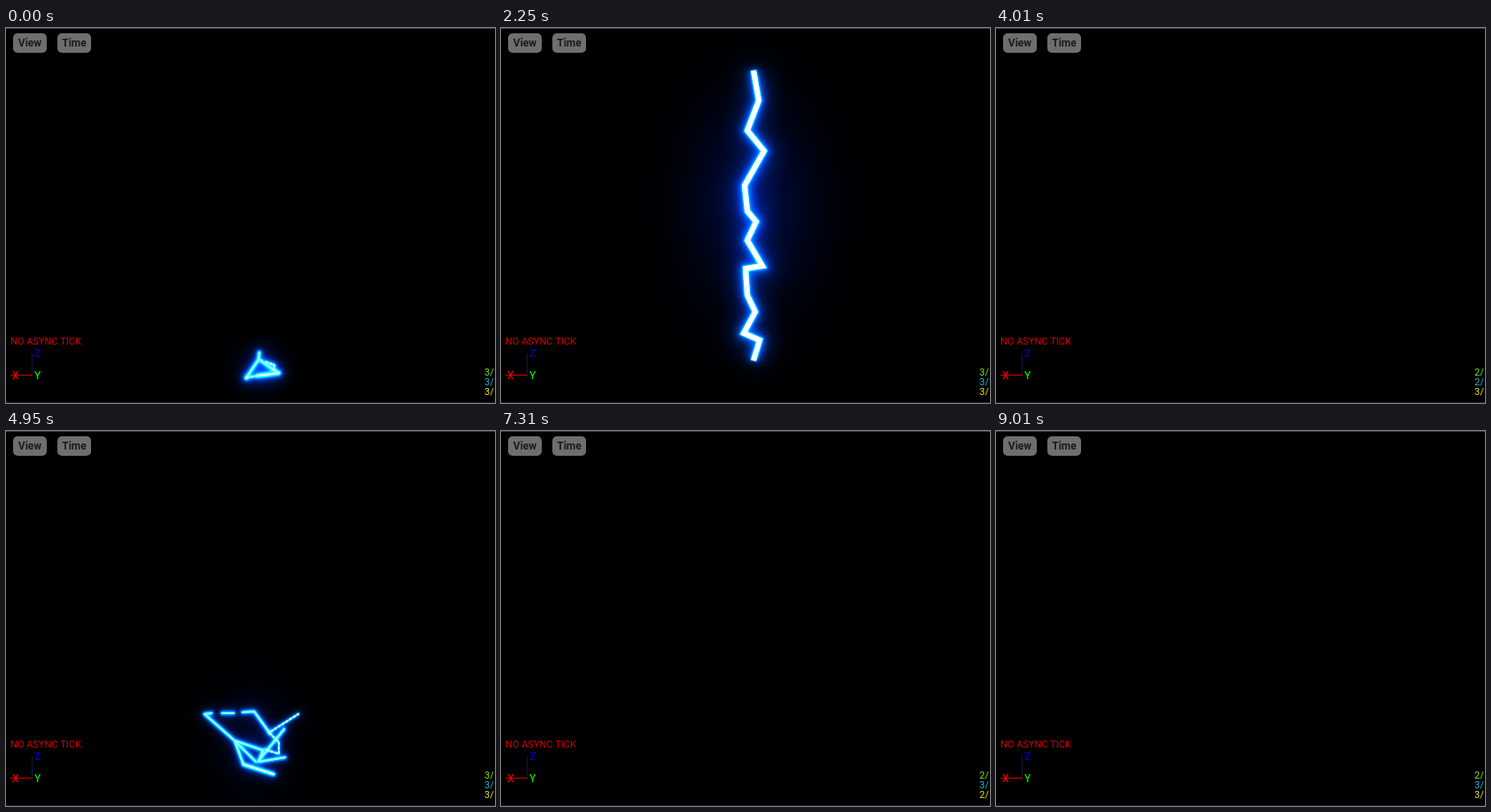
Animation of 552 by 424 pixels, one loop 9.19 s. Source, as an HTML page with a canvas:

```html
<!DOCTYPE html>
<html lang="en">
<head>
<meta charset="utf-8">
<title>Lightning preview</title>
<style>
  html, body { margin: 0; width: 100%; height: 100%; overflow: hidden; background: #000; }
  canvas { display: block; }
</style>
</head>
<body>
<canvas id="stage" width="552" height="424"></canvas>
<script>
const ctx = document.getElementById('stage').getContext('2d');
const LOOP = 9190;
const FONT = 'Roboto, sans-serif';

// Each burst: time span, glow ellipse, line width, and its solid and beaded paths.
const bursts = [
  {
    start: -260, end: 680, glow: [288, 385, 58, 58], power: 0.5, width: 4.6, gain: 1,
    solid: 'M286 367L285 375L271 396M285 374L297 383L308 390L284 393',
    beads: 'M308 390L272 395M294 378L303 381L302 387'
  },
  {
    start: 2040, end: 2800, glow: [284, 200, 158, 245], power: 1, width: 8.6, gain: 1, bolt: true,
    solid: 'M285 48L291 82L278 116L297 139L275 178L278 207L288 219L278 240L295 269' +
           'L276 272L278 302L287 321L274 345L292 353L285 376'
  },
  {
    start: 4470, end: 5410, glow: [279, 350, 140, 138], power: 0.5, width: 6.2, gain: 1.5,
    solid: 'M232 319L224 320L258 350L268 377L302 388M244 319L257 319M267 318L280 317L298 342' +
           'M258 350L290 361L285 374L315 369M314 337L285 373M258 350L282 374',
    beads: 'M330 320L297 341M298 342L308 352L308 365L292 360M268 377L302 388'
  },
  {
    start: 7370, end: 8170, glow: [284, 210, 142, 235], power: 1, width: 8.4, gain: 1, bolt: true,
    solid: 'M285 50L288 85L288 105L281 115L290 125L276 134L276 162L289 207L287 222L290 235' +
           'L283 237L278 264L290 276L285 322L288 341M293 347L285 374'
  },
  {
    start: 7650, end: 8550, glow: [283, 386, 32, 32], power: 0.5, width: 2.4, gain: 0.5,
    solid: 'M285 374L288 399',
    beads: 'M265 391L294 380L293 374L274 385M265 391L283 398'
  }
];
for (const b of bursts) {
  b.solid = new Path2D(b.solid);
  b.beads = new Path2D(b.beads || '');
}

// Counter changes: time, row, value.
const counts = [
  [1170, 2, 2], [1670, 2, 3], [3140, 1, 2], [3580, 1, 3], [3760, 0, 2], [4010, 1, 2],
  [4470, 0, 3], [4470, 1, 3], [6440, 0, 2], [7310, 2, 2], [7370, 0, 3], [7370, 2, 3], [9010, 0, 2]
];
const countColors = ['#7ee61e', '#1fb6d8', '#e6e620'];

function text(str, x, y, size, color, weight = 400) {
  ctx.font = `${weight} ${size}px ${FONT}`;
  ctx.fillStyle = color;
  ctx.fillText(str, x, y);
}

function rect(x, y, w, h, color) {
  ctx.fillStyle = color;
  ctx.fillRect(x, y, w, h);
}

function button(label, x) {
  ctx.fillStyle = '#6e6e6e';
  ctx.beginPath();
  ctx.roundRect(x, 6, 38, 22, 5);
  ctx.fill();
  ctx.textAlign = 'center';
  text(label, x + 19, 21, 12, '#1c1c1c', 700);
  ctx.textAlign = 'left';
}

function halo([x, y, rx, ry], scale, alpha) {
  const g = ctx.createRadialGradient(0, 0, 0, 0, 0, 1);
  for (let i = 0; i <= 10; i++) {
    const u = i / 10;
    g.addColorStop(u, `rgba(0,18,105,${alpha * (1 - u) ** 2.5})`);
  }
  ctx.save();
  ctx.translate(x, y);
  ctx.scale(rx * scale, ry * (rx === ry ? scale : 0.7 + 0.3 * scale));
  ctx.fillStyle = g;
  ctx.beginPath();
  ctx.arc(0, 0, 1, 0, 7);
  ctx.fill();
  ctx.restore();
}

function layer(b, width, blur, color, alpha) {
  ctx.filter = `blur(${blur}px)`;
  ctx.strokeStyle = color;
  ctx.lineWidth = width;
  ctx.globalAlpha = Math.min(1, alpha);
  ctx.stroke(b.solid);
  ctx.globalAlpha *= 0.55;
  ctx.stroke(b.beads);
}

function drawBurst(b, t) {
  if (t < b.start || t >= b.end) return;
  const left = 1 - (t - b.start) / (b.end - b.start);
  const amp = Math.min(1, 1.9 * left * left);
  const a = Math.min(1, amp * b.gain);
  const w = b.width * left;

  ctx.save();
  ctx.globalCompositeOperation = 'lighter';
  ctx.lineCap = b.bolt ? 'butt' : 'round';
  ctx.lineJoin = b.bolt ? 'miter' : 'round';
  ctx.miterLimit = 3;
  halo(b.glow, amp ** b.power, a * (b.bolt ? 0.85 : 0.7));
  layer(b, w * 3.5, w * 2, 'rgb(0,42,150)', a * 0.75);
  layer(b, w * 1.9, w * 0.8, 'rgb(0,95,235)', a * 0.9);
  layer(b, w + 1.5, 1.3, 'rgb(0,150,255)', a * 1.6);
  layer(b, w * (b.bolt ? 0.95 : 0.72), 0.6, b.bolt ? '#fff' : 'rgb(150,225,255)', a * 2.5);
  // bright beads along the thinner arcs
  ctx.setLineDash([1, 4]);
  ctx.globalAlpha = Math.min(1, a * 1.5);
  ctx.strokeStyle = 'rgb(130,225,255)';
  ctx.stroke(b.beads);
  ctx.restore();
}

function drawOverlay(t) {
  rect(0, 0, 552, 1, '#3a3a3a');
  rect(0, 423, 552, 1, '#2c1a24');
  button('View', 8);
  button('Time', 58);
  text('NO ASYNC TICK', 5, 358, 11, '#d40000');

  rect(29, 368, 1, 24, '#14143c');
  rect(5, 392, 25, 1, '#c80000');
  text('Z', 32, 372, 12, '#0000b4', 500);
  text('X', 7, 397, 12, '#e00000', 500);
  text('Y', 32, 397, 12, '#00e000', 500);

  const values = [3, 3, 3];
  for (const [at, row, value] of counts) if (t >= at) values[row] = value;
  values.forEach((v, i) => text(v + '/', 540, 393 + 11 * i, 11, countColors[i]));
}

function frame() {
  const t = performance.now() % LOOP;
  rect(0, 0, 552, 424, '#000');
  for (const b of bursts) drawBurst(b, t);
  drawOverlay(t);
  requestAnimationFrame(frame);
}
frame();
</script>
</body>
</html>
```
